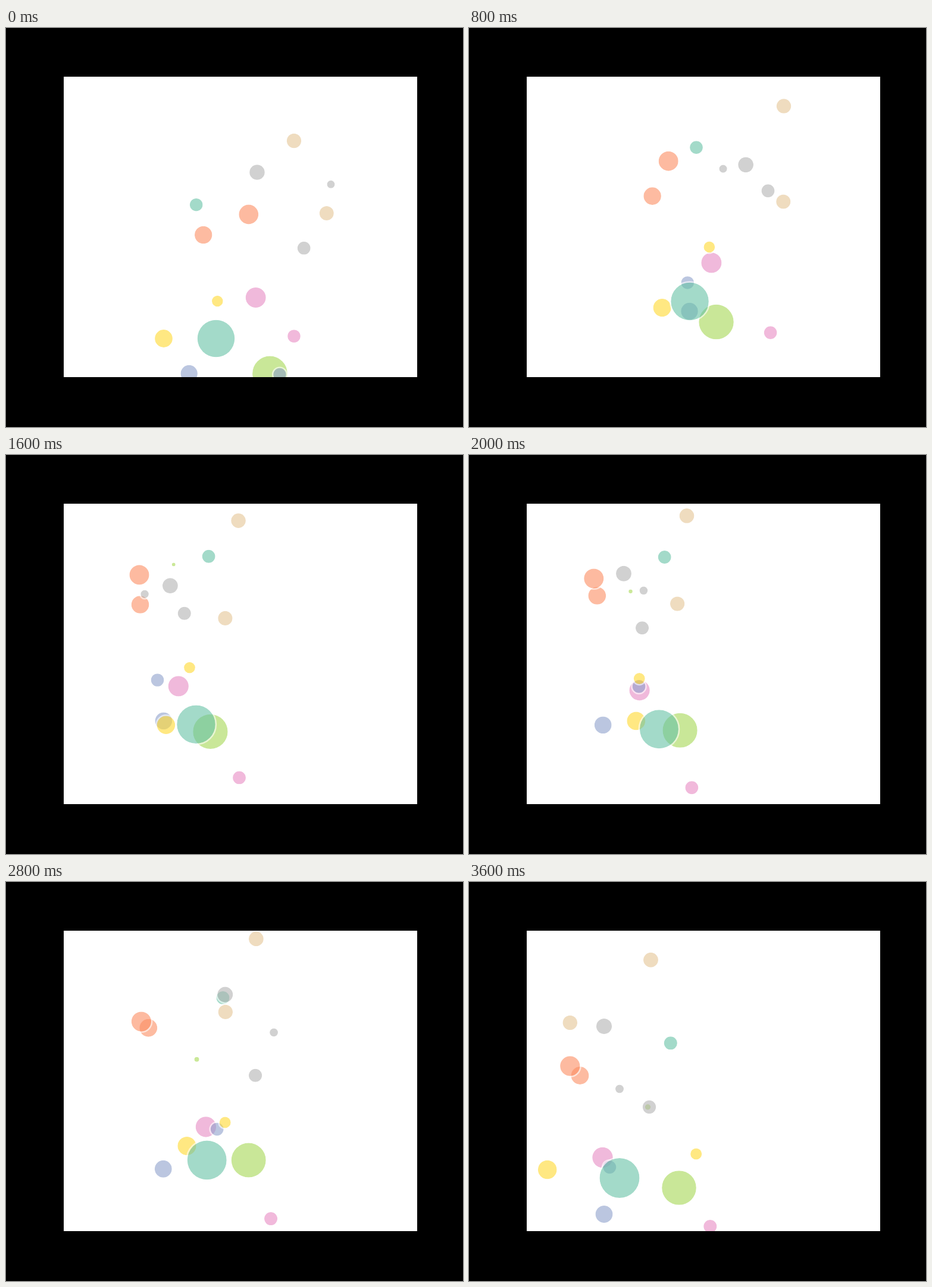
An HTML page with a canvas for the animation above (4000 ms loop, 768 px wide and 672 px high).

```html
<!DOCTYPE html>
<html lang="en">
<head>
<meta charset="utf-8">
<title>Bubbles</title>
<style>
html, body { margin: 0; width: 100%; height: 100%; overflow: hidden; background: #000; }
canvas { display: block; }
</style>
</head>
<body>
<canvas id="stage" width="768" height="672"></canvas>
<script>
const ctx = document.getElementById('stage').getContext('2d');
const STEP = 400, COUNT = 10, LEG = 3, LIFT = 38, RING = 2.4;

// swing: how far bubbles of a colour sway sideways between waypoints
const teal   = { fill: '#66c2a5', swing: 28 };
const orange = { fill: '#fc8d62', swing: 28 };
const blue   = { fill: '#8da0cb', swing: 45 };
const pink   = { fill: '#e78ac3', swing: 50 };
const green  = { fill: '#a6d854', swing: 32 };
const yellow = { fill: '#ffd92f', swing: 45 };
const tan    = { fill: '#e5c494', swing: 63 };
const grey   = { fill: '#b3b3b3', swing: 90 };

const bubbles = [];

// Four waypoints, one every LEG steps; listed from back to front.
function bubble(kind, radius, points, growth = 0.03) {
  bubbles.push({ kind, radius, points, growth });
}

bubble(green, 29.4, [[443.5, 582], [360, 501], [393.5, 494.5], [353, 515]], -0.06);
bubble(green, 1.5, [[320, -150], [319.7, 172], [289, 308], [300.5, 379]], 0.36);
bubble(pink, 17, [[419.7, 454], [336.3, 415.5], [326.7, 436], [224.5, 464]]);
bubble(pink, 10.8, [[484, 519], [453, 559.5], [400, 610], [405.3, 580]]);
bubble(blue, 14.2, [[307.7, 582], [343.5, 474], [224.5, 494.5], [227, 559.5]]);
bubble(blue, 10.7, [[460, 583.5], [262.5, 401], [355.5, 433.7], [236.3, 480.3]]);
bubble(yellow, 14.9, [[265, 523], [296, 494.5], [331.7, 474], [131.7, 484.5]], 0.1);
bubble(yellow, 9.3, [[355.3, 460], [369.7, 372.7], [303, 427.7], [381.7, 458]]);
bubble(teal, 31.3, [[353, 523], [343.7, 478.5], [343.7, 502.7], [253, 498.5]], 0.24);
bubble(teal, 10.8, [[319.7, 297.7], [376.8, 202.3], [341, 206.3], [338.8, 271.3]]);
bubble(orange, 14.7, [[331.7, 348.5], [260, 299.8], [229.3, 255], [186.5, 326]]);
bubble(orange, 16.4, [[407.8, 314], [262.5, 228.7], [219.8, 247], [169.8, 310]]);
bubble(tan, 12.2, [[484, 190], [469.7, 151.7], [396, 127.2], [305.5, 131.3]]);
bubble(tan, 12, [[538.8, 312], [441.2, 332.2], [386.5, 259.2], [169.8, 237]]);
bubble(grey, 10.9, [[500.7, 370.7], [386.5, 275.3], [360.2, 348.5], [303, 379]]);
bubble(grey, 12.8, [[422, 243], [369.8, 273.3], [322, 212.3], [227, 243]]);
bubble(grey, 6.5, [[546, 263.3], [250.7, 273.3], [431.7, 255.2], [253, 348.5]], 0.06);

// Straight legs between waypoints, swayed left and right in turn and lifted midway.
function place({ kind, points }, step) {
  const leg = Math.floor(step / LEG), part = step / LEG - leg;
  const [x0, y0] = points[leg];
  const [x1, y1] = points[Math.min(leg + 1, points.length - 1)];
  const wave = Math.sin(Math.PI * step / LEG);
  return [
    x0 + (x1 - x0) * part + kind.swing * wave,
    y0 + (y1 - y0) * part - LIFT * Math.abs(wave)
  ];
}

function circle(x, y, r) {
  ctx.beginPath();
  ctx.arc(x, y, r, 0, 2 * Math.PI);
}

function drawBubble(b, step) {
  const [x, y] = place(b, step);
  const r = b.radius + b.growth * step;
  ctx.fillStyle = b.kind.fill;
  circle(x, y, r);
  ctx.fill();
  circle(x, y, r + RING / 2);
  ctx.stroke();
}

function draw(step) {
  ctx.fillStyle = '#000';
  ctx.fillRect(0, 0, 768, 672);
  ctx.save();
  ctx.beginPath();
  ctx.rect(97, 82, 594, 506);
  ctx.clip();
  ctx.fillStyle = '#fff';
  ctx.fillRect(97, 82, 594, 506);
  ctx.globalAlpha = 0.6;
  ctx.strokeStyle = '#fff';
  ctx.lineWidth = RING;
  bubbles.forEach(b => drawBubble(b, step));
  ctx.restore();
}

let start = null;
function tick(now) {
  if (start === null) start = now;
  draw(Math.floor((now - start) / STEP) % COUNT);
  requestAnimationFrame(tick);
}
draw(0);
requestAnimationFrame(tick);
</script>
</body>
</html>
```
